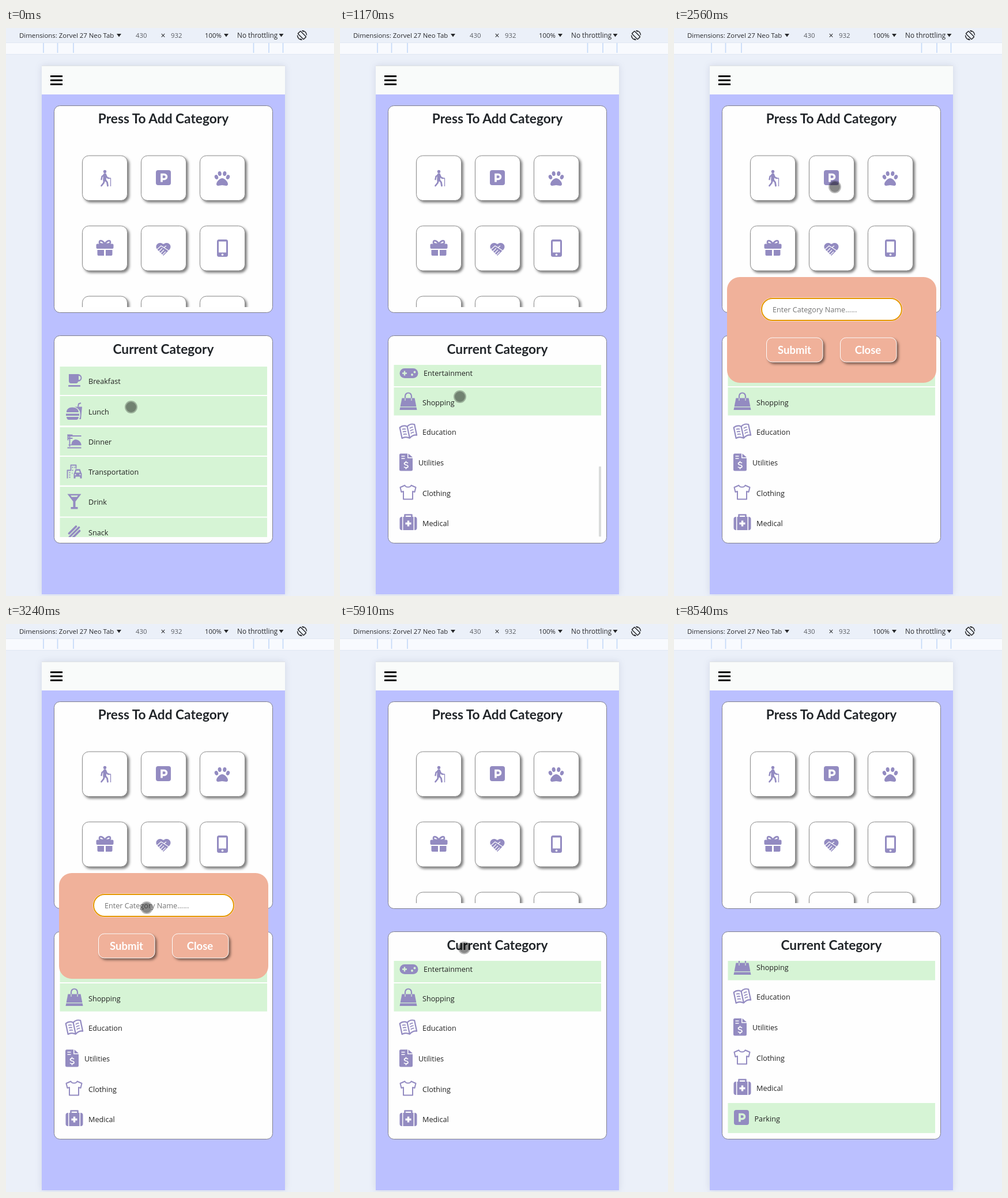
These frames come from a looping animation (569 by 983 pixels, 8810 ms). An HTML page:

```html
<!DOCTYPE html>
<html lang="en">
<head>
<meta charset="utf-8">
<title>Category settings</title>
<style>
html, body { margin: 0; width: 100%; height: 100%; overflow: hidden; background: #ebf0f9; }
svg { display: block; width: 569px; height: 983px; }
text { font-family: "Open Sans", "Noto Sans", sans-serif; fill: #222; white-space: pre; }
.bar text { font-size: 11.4px; fill: #27282b; }
.bar .dim { fill: #5a5d63; }
.title { font: 700 22.7px Lato, sans-serif; fill: #212529; text-anchor: middle; }
.item, .field { font-size: 12.65px; }
.field { fill: #757575; }
.label { font: 700 18.5px Lato, sans-serif; fill: #fff; text-anchor: middle; }
.card { fill: #fefefe; stroke: #80808c; }
.tile { fill: #fff; stroke: #8a8a8a; }
.raised { filter: drop-shadow(3px 3px 2px rgba(0, 0, 0, .5)); }
.icon { fill: #938bc1; stroke: none; }
.icon .l { fill: none; stroke: #938bc1; stroke-width: 2.2; stroke-linejoin: round; }
.icon .c { fill: none; stroke: var(--bg); stroke-width: 1.6; }
.icon .h { fill: var(--bg); }
</style>
</head>
<body>
<svg viewBox="0 0 569 983" id="stage">
  <defs>
    <clipPath id="gridClip"><path d="M93 183H453V483H93Z"/></clipPath>
    <clipPath id="listClip"><path d="M93 583H453V881H93Z"/></clipPath>
  </defs>
  <rect width="569" height="983" fill="#ebf0f9"/>
  <rect y="25" width="569" height="20" fill="#f8fafe"/>
  <path d="M0 25.5H569M0 45.5H569" stroke="#e0e7f2"/>
  <path d="M65 26V43M89.500 26V43M117 26V43M429.500 26V43M456 26V43M480.500 26V43" stroke="#c3d9f8" stroke-width="1.6"/>
  <g class="bar">
    <text x="23" y="16.5">Dimensions: Zorvel 27 Neo Tab</text>
    <text class="dim" x="225" y="16.5">430</text>
    <text x="268.500" y="18" style="font-size:14px">×</text>
    <text class="dim" x="286" y="16.5">932</text>
    <text x="345" y="16.5">100%</text>
    <text x="401" y="16.5" style="font-size:11.8px">No throttling</text>
    <path d="M192 10H200L196 15.500ZM378 10H386L382 15.500ZM473.500 10H481.500L477.500 15.500Z" fill="#27282b"/>
    <g transform="translate(513.500 12.500)" fill="none" stroke="#27282b" stroke-width="1.5">
      <rect x="-3.200" y="-7" width="6.400" height="14" rx="1" transform="rotate(-45)"/>
      <path d="M0-8A8 8 0 0 1 8 0M0 8A8 8 0 0 1-8 0M0-8L3-6M0 8L-3 6"/>
    </g>
  </g>
  <rect x="62" y="65" width="422" height="915" fill="#bbc0ff" style="filter:drop-shadow(0 0 6px rgba(80,90,130,.16))"/>
  <rect x="62" y="65" width="422" height="50" fill="#f9fbfa"/>
  <path d="M62 65.500H484" stroke="#dfe2e4"/>
  <path d="M77 83.500H98M77 90.500H98M77 97.500H98" stroke="#000" stroke-width="3"/>

  <rect class="card" x="83.500" y="134.500" width="379" height="358" rx="10"/>
  <text class="title" x="273" y="165">Press To Add Category</text>
  <g id="grid" clip-path="url(#gridClip)"></g>

  <rect class="card" x="83.500" y="532.500" width="379" height="359" rx="10"/>
  <text class="title" x="273" y="564">Current Category</text>
  <g clip-path="url(#listClip)">
    <g id="list"></g>
    <rect id="thumb" x="449" width="4" rx="1" fill="#7a807c" fill-opacity=".55"/>
  </g>

  <g id="modal">
    <rect x="92" y="431" width="363" height="183" rx="22" fill="#f0b19a"/>
    <rect x="150.500" y="466.500" width="246" height="41" rx="20.500" fill="#fff"/>
    <rect x="152" y="468" width="243" height="38" rx="19" fill="#fff" stroke="#e59700" stroke-width="2"/>
    <text id="field" class="field" x="171" y="492"></text>
    <rect id="caret" y="478" width="1" height="18" fill="#222"/>
    <g fill="#f0b19a" stroke="#fff">
      <rect class="raised" x="160.500" y="536" width="97.500" height="42" rx="10"/>
      <rect class="raised" x="288.500" y="536" width="97.500" height="42" rx="10"/>
    </g>
    <text class="label" x="209" y="563.500">Submit</text>
    <text class="label" x="336.500" y="563.500">Close</text>
  </g>
  <g id="touch">
    <circle r="11" fill="#000" fill-opacity=".27"/>
    <circle r="9" fill="#000" fill-opacity=".27"/>
  </g>
</svg>
<script>
const $ = id => document.getElementById(id);
const GREEN = '#d6f4d5', WHITE = '#fefefe', LOOP = 8810;

const line = (d, w = 2.2, cap = 'butt') => `<path class="l" d="${d}" style="stroke-width:${w};stroke-linecap:${cap}"/>`;
const cut = (d, w = 1.6) => `<path class="c" d="${d}" style="stroke-width:${w}"/>`;
const fill = d => `<path fill-rule="evenodd" d="${d}"/>`;
const dot = (x, y, r, c = '') => `<circle class="${c}" cx="${x}" cy="${y}" r="${r}"/>`;
const box = (x, y, w, h, r = 0, c = '') => `<rect class="${c}" x="${x}" y="${y}" width="${w}" height="${h}" rx="${r}"/>`;

// Icons are drawn around their own centre.
const icons = {
  walker: dot(-1, -11.5, 2.7) + line('M-1-6L-1.500 3', 5.5, 'round') + line('M-2 3L-3 8-7 13M0 3L3 7 4 13', 2.8, 'round')
    + line('M-2-6L-6-3-7 2M1-5L3-1 6 0', 2.4, 'round') + line('M5 0H9V14', 1.3),
  parking: box(-13, -13, 26, 26, 4) + cut('M-3 7.500V-5.500H1.500A4 4 0 0 1 1.500 2.500H-3', 3.6),
  paw: fill('M0-1C4-1 10 5 10 9C10 14 4 11 0 11S-10 14-10 9C-10 5-4-1 0-1Z')
    + [[-10, -3, -20], [-4.3, -9, -10], [4.3, -9, 10], [10, -3, 20]].map(([x, y, a]) =>
      `<ellipse rx="3.100" ry="4" transform="translate(${x} ${y}) rotate(${a})"/>`).join(''),
  gift: box(-15, -6.5, 30, 8.5, 2) + fill('M-13 4H-1.500V14H-11A2 2 0 0 1-13 12ZM1.500 4H13V12A2 2 0 0 1 11 14H1.500Z')
    + line('M0-6C-3-12-9-14-9.500-9.500C-10-6-5-6 0-6C5-6 10-6 9.500-9.500C9-14 3-12 0-6', 2.8),
  heart: fill('M0 12L-11 1C-16-6-8-14 0-8C8-14 16-6 11 1Z')
    + cut('M-13 3L-4-5 1-2 5-5M-9 6L-2-1M-6 9L1 2M-3 12L4 5M1-2L10 4', 1.2),
  phone: box(-9.5, -15, 19, 30, 3.5) + box(-6.5, -11.5, 13, 19, 0, 'h') + dot(0, 11.2, 1.8, 'h'),
  cup: fill('M-10-11H6A6.500 6.500 0 0 1 6 2C6 4 4 5 3 5H-6A4 4 0 0 1-10 1ZM7-8V-1A3.500 3.500 0 0 0 7-8Z') + box(-11, 8, 21, 2.7, 1),
  burger: fill('M-13 1.500C-13-4-9-7-3-7S8-4 8 1.500ZM-14 4H9V7.500H-14ZM-13 9.500H8C8 12.500 6 14.500 4 14.500H-9C-11 14.500-13 12.500-13 9.500ZM1-8H14L12 13.500H9C11 10 11 6 10.500 2C10-3 6-6 1-8Z')
    + line('M7-8L8-13 12-14.500', 2),
  dinner: line('M-11-12V-2M-8-12V9M-11-9.500H12M-11-5.500H-3', 1.8) + line('M-12-11H-3M-12 11H12', 1.8)
    + fill('M-5 6C-5-2 1-4 4-3C9-2 12 2 12 6Z') + line('M-10 6H12', 1.5),
  transit: line('M-12 12V-2H-6V-11H3V-5', 1.8) + line('M-4-7H-2M0-7H1.500M-4-2H-2M-9 2H-7M-9 6H-7M-9 10H-7M-4 3H-3', 1.8)
    + fill('M0 2L2-4H10L12 2C13 3 13 4 13 5V12H10V9H2V12H-1V5C-1 3 0 2 0 2ZM2.500 2H9.500L8.500-1.500H3.500Z')
    + dot(2, 5.5, 1.2, 'h') + dot(10, 5.5, 1.2, 'h'),
  glass: fill('M-12-13H12L2 0V9.500H6V13H-6V9.500H-2V0ZM-6.500-10.500H6.500L4.500-8H-4.500Z'),
  hotdog: `<g transform="rotate(-45)">${line('M-11.500 0H11.500', 3.4, 'round') + line('M-8-4.800H9M-9 4.800H8', 3.6, 'round')}</g>`,
  house: fill('M-17.500 0L0-15.500 6-10V-13H11V-5.500L17.500 0 16 2H13V13C13 14 12.500 14.500 12 14.500H-12C-12.500 14.500-13 14-13 13V2H-16ZM-3.500-2.500V4H3.500V-2.500Z'),
  cart: line('M-14.500-11H-9.500L-5 6H11', 2.4) + fill('M-8.500-9H14.500L11 2.500H-6Z') + dot(-4, 10, 2.3) + dot(9, 10, 2.3),
  pad: box(-16, -8.5, 32, 17, 8.5) + cut('M-11.500 0H-3.500M-7.500-4V4', 2.4) + dot(5.5, 2.5, 1.9, 'h') + dot(10, -2, 1.9, 'h'),
  bag: fill('M-11-5.500H11L15 15H-15Z') + line('M-5.500-3V-9A5.500 5.500 0 0 1 5.500-9V-3', 2.2)
    + cut('M-15 9.800H15', 1.2) + cut('M-5.500-5.500V-1M5.500-5.500V-1', 1.2),
  book: `<g transform="rotate(-12)">${line('M0-9C-4-12-9-12-13-10V9C-9 7.500-4 8.500 0 11.500C4 8.500 9 7.500 13 9V-10C9-12 4-12 0-9V11')
    + line('M-9.500-6C-7-6.500-5-6-3.500-5M-9.500-1.500C-7-2-5-1.500-3.500-.5M-9.500 3C-7 2.500-5 3-3.500 4M9.500-6C7-6.500 5-6 3.500-5M9.500-1.500C7-2 5-1.500 3.500-.5M9.500 3C7 2.500 5 3 3.500 4', 1.8)}</g>`,
  bill: fill('M-9-15H2.500V-7H11.500V12.500A2.500 2.500 0 0 1 9 15H-9A2.500 2.500 0 0 1-11.500 12.500V-12.500A2.500 2.500 0 0 1-9-15ZM4-15L11.500-8.500H4Z')
    + cut('M-8-10.500H-2M-8-6.500H-2') + cut('M3.500 1.500C1-.5-3 0-3 2.300C-3 5.500 3.500 4 3.500 7.200C3.500 10-1.500 10-3.500 8M0-2V0M0 9.500V12', 1.7),
  shirt: line('M-5.500-12L-13.500-8.500-11.500-.500-8-1.500V12H8V-1.500L11.500-.500 13.500-8.500 5.500-12C4-8-4-8-5.500-12Z', 2),
  medkit: box(-15, -9, 30, 23, 4) + line('M-6-9V-12.500H6V-9', 2.6) + cut('M-9.800-9V14M9.800-9V14', 1.5) + cut('M-5 2.500H5M0-2.500V7.500', 3.4),
};

const icon = (name, x, y, bg = WHITE) =>
  `<g class="icon" style="--bg:${bg}" transform="translate(${x} ${y})">${icons[name]}</g>`;

const tiles = [['walker', 172.5, 260], ['parking', 273, 259], ['paw', 375, 261],
  ['gift', 171.5, 380], ['heart', 273, 382], ['phone', 375.5, 381]];
$('grid').innerHTML = [0, 1, 2].map(r => [132.5, 234.5, 336.5].map(x =>
  `<rect class="tile raised" x="${x}" y="${221 + r * 121.6}" width="78" height="77.500" rx="11"/>`).join('')).join('')
  + tiles.map(t => icon(...t)).join('');

// label, text x, text centre, icon, icon x, icon y, row top, row bottom (green rows only)
const rows = [
  ['Breakfast', 143, 611, 'cup', 119, 610, 586, 635],
  ['Lunch', 143, 663.5, 'burger', 118, 663.5, 637, 688],
  ['Dinner', 143, 716, 'dinner', 118.5, 715.5, 691, 740],
  ['Transportation', 143, 768, 'transit', 118.5, 767.5, 742, 791.5],
  ['Drink', 143, 820, 'glass', 118.5, 819.5, 794, 845.5],
  ['Snack', 143, 873, 'hotdog', 118.5, 872.5, 847.5, 898],
  ['Housing', 146.5, 926, 'house', 120.5, 925, 900.5, 950],
  ['Daily Use', 141, 977, 'cart', 118, 977.5, 952, 1000.5],
  ['Entertainment', 145, 1028, 'pad', 119.5, 1028.5, 1003, 1051],
  ['Shopping', 143, 1079, 'bag', 118.5, 1077, 1053, 1101.5],
  ['Education', 143, 1130, 'book', 118.5, 1129.5],
  ['Utilities', 136, 1183, 'bill', 114.5, 1182.5],
  ['Clothing', 143, 1235.5, 'shirt', 118, 1234.5],
  ['Medical', 143, 1288, 'medkit', 118.5, 1286],
  ['Parking', 139.5, 1341, 'parking', 117, 1339, 1314, 1366],
];
$('list').innerHTML = rows.map(([label, x, y, name, ix, iy, top, end]) =>
  (top ? `<rect x="93.500" y="${top}" width="359.500" height="${end - top}" fill="${GREEN}"/>` : '')
  + icon(name, ix, iy, top ? GREEN : WHITE)
  + `<text class="item" x="${x}" y="${y + 5}">${label}</text>`).join('');

// Keys are [time, values, steps]; one step means hold, then jump.
function track(keys, t) {
  let i = keys.length - 1;
  while (i > 0 && keys[i][0] > t) i--;
  const [t0, a] = keys[i], next = keys[i + 1];
  if (!next) return a;
  const [t1, b, n = 1] = next;
  const u = Math.floor((t - t0) / (t1 - t0) * n) / n;
  return a.map((v, k) => v + (b[k] - v) * u);
}

const touch = [
  [0, [217, 656]], [60, [212, 646]], [120, [208, 638]],
  [1660, [208, 638]], [1970, [278, 376], 5], [2200, [279, 275], 4],
  [2770, [279, 275]], [3240, [244, 491], 7],
  [4000, [244, 491]], [4170, [237, 492], 2],
  [5450, [237, 492]], [5700, [215.5, 560.5], 4],
  [6490, [215.5, 560.5]], [6740, [315.5, 762], 4],
  [7350, [315.5, 762]], [7670, [201, 872], 5], [8470, [240, 883]],
];
const scroll = [[0, [0]], [270, [60]], [390, [140]], [580, [235]], [640, [296]], [800, [431]], [6950, [460]], [7010, [485]]];
const thumb = [[0, [0]], [270, [1]], [1170, [.5]], [1320, [0]], [6950, [1]], [7410, [.5]], [7480, [0]]];
const modal = [[0, [0]], [2310, [0]], [2560, [1], 4], [5700, [1]], [5910, [0], 3]];
const typed = [[0, [0]], [3890, [1]], [4050, [2]], [4360, [3]], [4420, [4]], [4700, [5]], [4890, [7]]];

const set = (id, attrs) => { for (const k in attrs) $(id).setAttribute(k, attrs[k]); };

function draw(t) {
  const [x, y] = track(touch, t);
  set('touch', { transform: `translate(${x} ${y})`, opacity: t < 8540 ? 1 : 0 });

  const [top] = track(scroll, t), size = t < 5910 ? 731 : 784;
  set('list', { transform: `translate(0 ${-top})` });
  set('thumb', { y: 583 + top * 298 / size, height: 298 * 298 / size, opacity: track(thumb, t)[0] });

  const word = 'Parking'.slice(0, track(typed, t)[0]);
  set('modal', { opacity: track(modal, t)[0] });
  $('field').textContent = word || 'Enter Category Name......';
  const end = word ? $('field').getComputedTextLength() : 0;
  set('caret', { x: Math.round(171 + end), opacity: t >= 3580 && t < 5450 ? 1 : 0 });
}

const start = performance.now();
function tick() {
  draw((performance.now() - start) % LOOP);
  requestAnimationFrame(tick);
}
tick();
</script>
</body>
</html>
```
